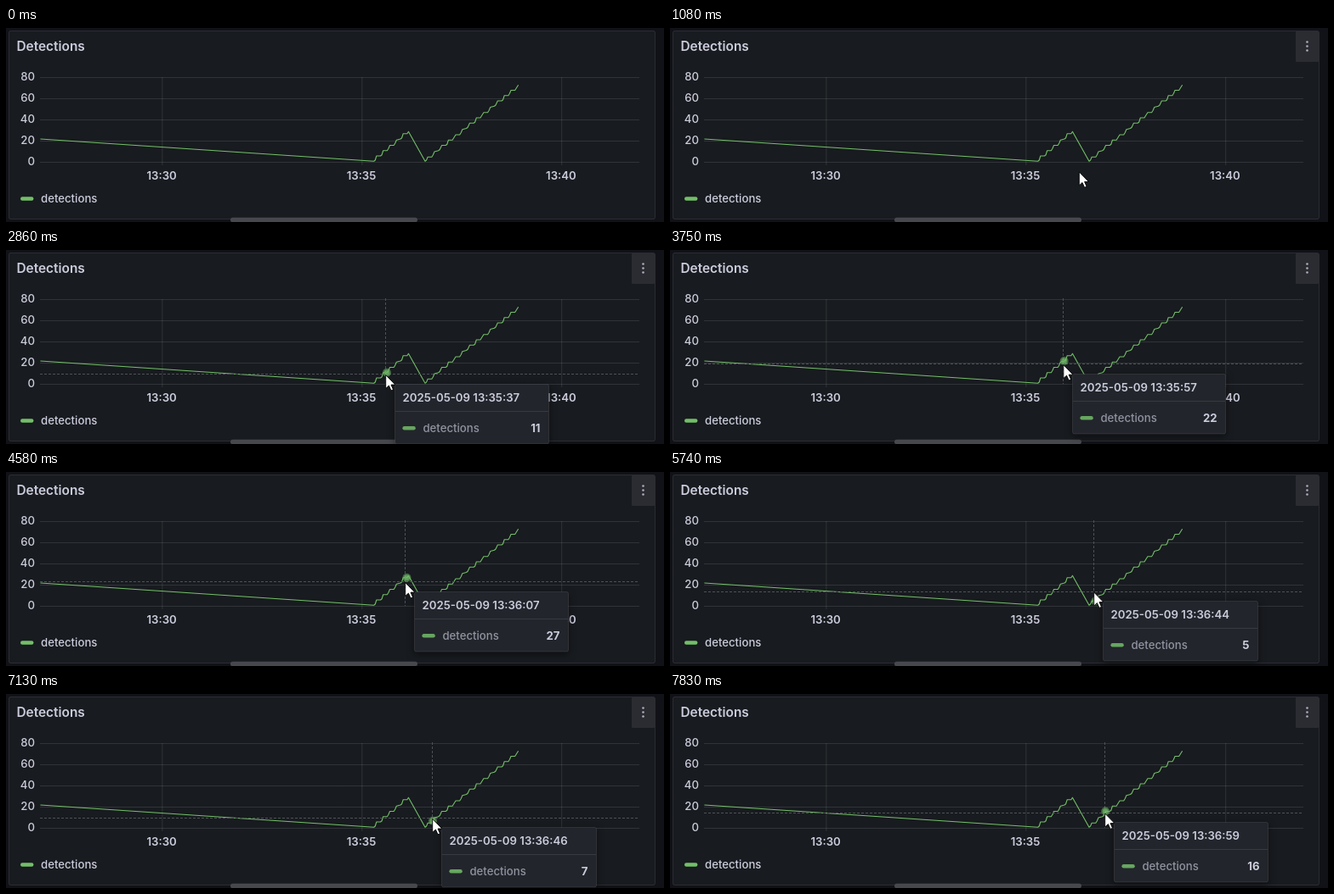
These frames come from a looping animation (774 by 229 pixels, 8 s). An HTML page with a canvas:

```html
<!DOCTYPE html>
<html lang="en">
<head>
<meta charset="utf-8">
<title>Detections</title>
<style>
html, body { margin: 0; width: 100%; height: 100%; overflow: hidden; background: #111217; }
canvas { display: block; }
</style>
</head>
<body>
<canvas id="stage" width="774" height="229"></canvas>
<script>
const ctx = document.getElementById('stage').getContext('2d');
const LOOP = 8000, STEP = 70;
const GREEN = '#73bf69', TEXT = '#ccccdc', MUTED = '#9193a0', DASH = '#4e5157';
const LINE = 'rgba(204,204,220,0.12)', GRID = 'rgba(240,250,255,0.11)';
const PLOT = { left: 40, right: 745, top: 58, bottom: 158 };

const ENTRY = { x: 490, y: 240 };
const MOVES = [
  { from: 520, to: 1360, x: 480, y: 160 },
  { from: 1490, to: 1780, x: 452, y: 150 },
  { from: 2170, to: 2860, x: 446.5, y: 146.5 },
  { from: 3050, to: 4580, x: 469.5, y: 129.5 },
  { from: 4710, to: 5530, x: 494, y: 132 },
  { from: 5530, to: 5740, x: 498.5, y: 141 },
  { from: 5740, to: 6100, x: 500.5, y: 153 },
  { from: 6290, to: 7130, x: 501.5, y: 146.4 },
  { from: 7130, to: 7830, x: 511.5, y: 140 }
];

// Staircase of [seconds after 13:35, count]: a short plateau, then a quick rise
function climb(start, pace, base, rise, end) {
  const points = [];
  for (let k = 0; start + k * pace <= end; k++) {
    for (const [wait, part] of [[0, 0], [6, 0.05], [8, 0.35]]) {
      const s = Math.round(start + k * pace + wait);
      const v = Math.max(1, Math.round(base + rise * (k + part)));
      if (k + wait > 0 && s <= end) points.push([s, v]);
    }
  }
  return points;
}

const DATA = [
  [-484, 22],
  ...climb(11, 10, 0.2, 5.3, 69),
  ...climb(87.55, 10.45, -0.1, 5.25, 234)
];

const xOf = s => 419 + s * 0.783;
const yOf = v => PLOT.bottom - v * 1.25;
const easeOut = p => 1 - (1 - p) ** 2;

function pointerAt(t) {
  if (t < MOVES[0].from) return null;
  let { x, y } = ENTRY;
  for (const m of MOVES) {
    if (t < m.from) break;
    const steps = Math.round((m.to - m.from) / STEP);
    const p = Math.min(1, (t - m.from) / (m.to - m.from));
    const e = easeOut(Math.floor(p * steps + 0.001) / steps);
    x += (m.x - x) * e;
    y += (m.y - y) * e;
  }
  return [x, y];
}

function nearest(x) {
  return DATA.reduce((a, b) => Math.abs(xOf(b[0]) - x) < Math.abs(xOf(a[0]) - x) ? b : a);
}

function stamp(s) {
  const pad = n => String(n).padStart(2, '0');
  const total = 35 * 60 + s;
  return `2025-05-09 13:${pad(Math.floor(total / 60))}:${pad(total % 60)}`;
}

function setFont(size, weight) {
  ctx.font = `${weight} ${size}px Inter, sans-serif`;
}

function text(str, x, y, { size = 13.2, weight = 500, color = TEXT, align = 'left' } = {}) {
  setFont(size, weight);
  ctx.fillStyle = color;
  ctx.textAlign = align;
  ctx.fillText(str, x, y);
}

function line(x0, y0, x1, y1, color) {
  ctx.strokeStyle = color;
  ctx.lineWidth = 1;
  ctx.beginPath();
  ctx.moveTo(x0, y0);
  ctx.lineTo(x1, y1);
  ctx.stroke();
}

function box(x, y, w, h, r, fill, stroke) {
  ctx.beginPath();
  ctx.roundRect(x, y, w, h, r);
  ctx.fillStyle = fill;
  ctx.fill();
  if (stroke) {
    ctx.shadowColor = 'transparent';
    ctx.strokeStyle = stroke;
    ctx.lineWidth = 1;
    ctx.stroke();
  }
}

function disc(x, y, r, color) {
  ctx.fillStyle = color;
  ctx.beginPath();
  ctx.arc(x, y, r, 0, Math.PI * 2);
  ctx.fill();
}

function drawPanel() {
  ctx.fillStyle = '#111217';
  ctx.fillRect(0, 0, 774, 229);
  box(3.5, 3.5, 760, 222, 2, '#181b1f', LINE);
  text('Detections', 12.5, 27, { size: 15.4, weight: 600 });
  box(17, 199.3, 15.4, 4.4, 2.2, GREEN);
  text('detections', 41, 206);
}

function drawChart() {
  for (let v = 0; v <= 80; v += 20) {
    const y = yOf(v);
    line(PLOT.left, y + 0.5, PLOT.right, y + 0.5, GRID);
    text(String(v), 34, y + 4.2, { align: 'right' });
  }
  for (let m = 30; m <= 40; m += 5) {
    const x = xOf((m - 35) * 60) - 0.2;
    line(x, PLOT.top, x, PLOT.bottom + 4, GRID);
    text('13:' + m, x - 0.8, 179, { weight: 600, align: 'center' });
  }
  ctx.strokeStyle = GREEN;
  ctx.lineWidth = 1.1;
  ctx.lineJoin = 'round';
  ctx.beginPath();
  DATA.forEach(([s, v]) => ctx.lineTo(xOf(s) + 0.4, yOf(v) + 0.5));
  ctx.stroke();
}

function drawMenu() {
  box(736, 4, 27, 36, 1, '#2b2c32');
  for (const y of [16.5, 21.5, 26.5]) disc(749.5, y, 1.3, '#b0b0be');
}

function drawCrosshair(x, y, s, v) {
  const cx = Math.floor(x) + 0.5, cy = Math.floor(y) + 0.5;
  ctx.setLineDash([3, 2]);
  line(cx, 57, cx, PLOT.bottom, DASH);
  line(PLOT.left, cy, PLOT.right, cy, DASH);
  ctx.setLineDash([]);
  disc(xOf(s), yOf(v) + 0.5, 5, 'rgba(115,191,105,0.5)');
  disc(xOf(s), yOf(v) + 0.5, 3.3, 'rgba(115,191,105,0.6)');
}

function drawTooltip(x, y, s, v) {
  const left = Math.floor(x) + 11, top = Math.round(y + 11);
  const label = stamp(s);
  setFont(13.2, 600);
  const w = Math.round(ctx.measureText(label).width + 43);
  ctx.save();
  ctx.shadowColor = 'rgba(0,0,0,0.5)';
  ctx.shadowBlur = 8;
  ctx.shadowOffsetY = 3;
  box(left + 0.5, top + 0.5, w, 70.5, 2, '#22252b', LINE);
  ctx.restore();
  line(left + 1, top + 32.5, left + w, top + 32.5, LINE);
  text(label, left + 9.6, top + 20.7, { weight: 600 });
  box(left + 9.4, top + 50, 15.4, 4.4, 2.2, '#67a660');
  text('detections', left + 33.4, top + 56.7, { color: MUTED });
  text(String(v), left + w - 9.5, top + 56.7, { weight: 700, align: 'right' });
}

function drawPointer(x, y) {
  const shape = [[0, 0], [0, 16], [3.7, 12.6], [6.3, 18.4], [8.8, 17.3], [6.3, 11.6], [11.2, 11.6]];
  ctx.beginPath();
  shape.forEach(([dx, dy]) => ctx.lineTo(x + dx + 0.2, y + dy + 1));
  ctx.closePath();
  ctx.lineJoin = 'miter';
  ctx.fillStyle = '#fff';
  ctx.fill();
  ctx.strokeStyle = '#000';
  ctx.lineWidth = 0.9;
  ctx.stroke();
}

function drawScrollbar(hover) {
  box(264, 223.8, 220, 5.2, 2.6, hover ? '#5a5b60' : '#47484d');
}

function draw(t) {
  const pointer = pointerAt(t);
  drawPanel();
  drawChart();
  if (!pointer) return drawScrollbar(false);

  const [x, y] = pointer;
  const inPlot = y < PLOT.bottom;
  const [s, v] = nearest(x);
  if (y < 226) drawMenu();
  if (inPlot) drawCrosshair(x, y, s, v);
  drawScrollbar(y > 222 && y < 232);
  if (inPlot) drawTooltip(x, y, s, v);
  drawPointer(x, y);
}

const start = performance.now();
function frame() {
  draw((performance.now() - start) % LOOP);
  requestAnimationFrame(frame);
}
frame();
</script>
</body>
</html>
```
